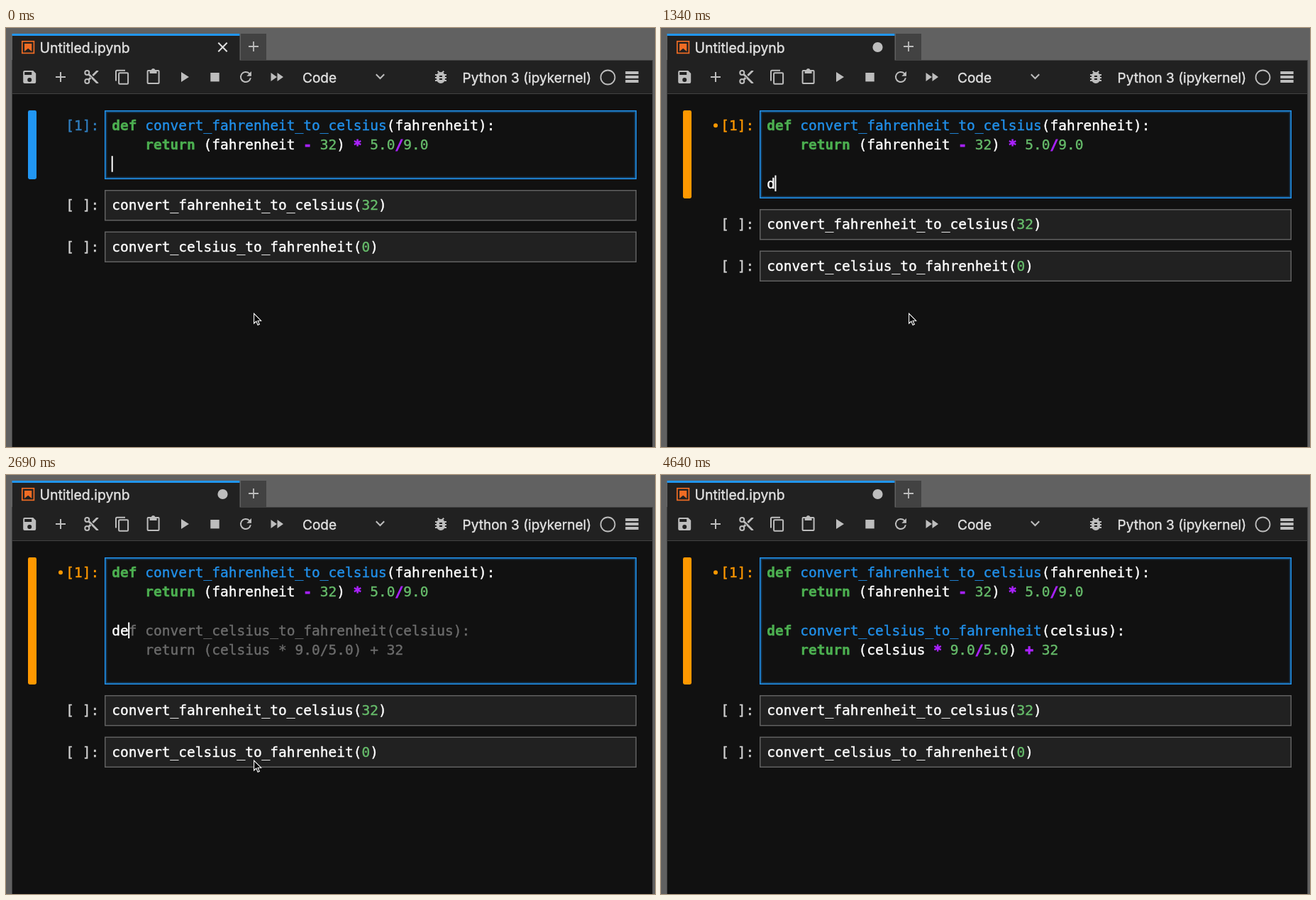
Write an HTML page that moves like this. It is 915x590 px and loops after 5.21 s.

```html
<!DOCTYPE html>
<html lang="en">
<head>
<meta charset="utf-8">
<title>Notebook autocomplete</title>
<style>
  html, body { margin: 0; width: 100%; height: 100%; overflow: hidden; background: #616161; }
  svg { display: block; color: #fff; }
  text, tspan { white-space: pre; fill: currentColor; stroke: currentColor; stroke-width: .4; }
  .ui { font: 19px Inter, sans-serif; color: #e2e2e2; }
  .title { font-size: 19.4px; }
  .mono, #code, #rest { font: 19.5px "DejaVu Sans Mono", monospace; }
  .icons { fill: #bdbdbd; }
  .line { fill: none; stroke: #bdbdbd; stroke-width: 2; }
  .cell { fill: #212121; stroke: #616161; stroke-width: 1.5; }
  .glow { fill: none; stroke: #2196f3; }
  .prompt { color: #d0d0d0; }
  .kw { color: #4caf50; font-weight: bold; }
  .fn { color: #2190ea; }
  .num { color: #66bb6a; }
  .op { color: #aa22ff; font-weight: bold; stroke-width: .8; }
  .ghost { color: #6c6c6c; }
</style>
</head>
<body>
<svg width="915" height="590" viewBox="0 0 915 590">
  <!-- window -->
  <rect x="8" y="45" width="904" height="560" fill="#424242"/>
  <rect x="9" y="93" width="902" height="500" fill="#111"/>
  <rect x="9" y="46" width="902" height="46" fill="#212121"/>
  <rect x="9" y="8" width="320.5" height="39" fill="#212121"/>
  <rect x="8.5" y="8" width="321" height="3" fill="#2196f3"/>
  <rect x="331" y="8" width="36" height="37" fill="#424242"/>

  <!-- tab -->
  <rect x="22.8" y="18.8" width="16.6" height="16.6" fill="none" stroke="#ef6c24" stroke-width="1.7"/>
  <path d="M26 22h10.3v11l-5.15-4.2L26 33z" fill="#ef6c24"/>
  <text class="ui title" x="47.5" y="34.5">Untitled.ipynb</text>
  <path id="close" class="line" d="M299.3 20.8l12.4 12.4m0-12.4l-12.4 12.4" style="stroke:#e0e0e0"/>
  <circle id="dirty" cx="305.5" cy="27" r="7.1" fill="#bdbdbd"/>
  <path class="line" d="M342 26h14m-7-7v14" style="stroke-width:1.8"/>

  <!-- toolbar -->
  <g class="icons" fill-rule="evenodd">
    <path transform="translate(21.2 57)" d="M17 3H5a2 2 0 0 0-2 2v14a2 2 0 0 0 2 2h14a2 2 0 0 0 2-2V7zM12 19a3 3 0 0 1 0-6 3 3 0 0 1 0 6zM15 9H5V5h10z"/>
    <path transform="translate(65 57)" d="M19 13h-6v6h-2v-6H5v-2h6V5h2v6h6z"/>
    <g transform="translate(108.3 57)">
      <circle class="line" cx="6" cy="6" r="3"/>
      <circle class="line" cx="6" cy="18" r="3"/>
      <path d="M9.6 7.6L22 20v1h-3L7.6 9.6zM19 3l-6 6 2 2 7-7V3zM7.6 14.4L10.5 11.5l2 2L9.6 16.4z"/>
    </g>
    <path class="line" d="M155 74.5V61.3q0-1.6 1.6-1.6H168M160.3 63.2h10.6q1.2 0 1.2 1.2v13.2q0 1.2-1.2 1.2h-10.6q-1.2 0-1.2-1.2V64.4q0-1.2 1.2-1.2z"/>
    <g transform="translate(195.6 57)">
      <rect class="line" x="4" y="3" width="16" height="18" rx="1"/>
      <path d="M7 2h2.2a3 3 0 0 1 5.6 0H17v5H7zM12 2a1 1 0 0 0 0 2 1 1 0 0 0 0-2z"/>
    </g>
    <path d="M247 62v14l11-7z"/>
    <path d="M288.3 63h12.4v12.4h-12.4z"/>
    <path transform="translate(326 57) scale(1.333)" d="M9 13.5a4.5 4.5 0 1 1 3.17-7.67L10 8h5V3l-1.76 1.76A6 6 0 1 0 14.9 10h-1.52A4.5 4.5 0 0 1 9 13.5z"/>
    <path d="M373.5 75l8.5-6-8.5-6zm9-12v12l8.5-6z"/>
    <g transform="translate(601 57)">
      <path d="M6 11a6 6 0 0 1 12 0v4a6 6 0 0 1-12 0zM10 10v2h4v-2zm0 4v2h4v-2z"/>
      <path class="line" d="M4 9h3.5m9 0H20M4 13h3m10 0h3M4 17h3.5m9 0H20M7.7 3.7L10.5 6.5m5.8-2.8L13.5 6.5"/>
    </g>
    <path d="M873.3 61h18.4v4h-18.4zm0 6h18.4v4h-18.4zm0 6h18.4v4h-18.4z"/>
  </g>
  <path class="line" d="M521.8 65.3l5.7 5.7 5.7-5.7"/>
  <circle class="line" cx="848.5" cy="69.5" r="10" style="stroke-width:1.8"/>
  <text class="ui" x="418" y="76.5">Code</text>
  <text class="ui" x="643.6" y="76.5">Python 3 (ipykernel)</text>

  <!-- active cell -->
  <rect id="bar" x="31" y="116" width="12" rx="2.4"/>
  <circle id="bullet" cx="77" cy="137.3" r="3" fill="#ff9800"/>
  <text id="prompt" class="mono" x="84.3" y="144">[1]:</text>
  <rect id="box" x="139.75" y="116.75" width="748.5" fill="#111" stroke="#2196f3" stroke-width="1.5"/>
  <rect id="glow" class="glow" x="141" y="118" width="746" opacity=".45"/>
  <rect id="haze" class="glow" x="142" y="119" width="744" opacity=".18"/>
  <g id="code"></g>
  <rect id="caret" width="2" height="22.5" fill="#fff"/>

  <g id="rest"></g>
  <path id="mouse" d="M349.6 402v14l3.2-3 2.3 5.2 2.2-1-2.3-5h4.6z" fill="#000" stroke="#fff" stroke-width="1.1"/>
</svg>
<script>
const $ = id => document.getElementById(id);
const LOOP = 5210, LEFT = 149.3, CHAR = 11.74, LINE = 27.3, BASE = 144;

// time, column, line; no position means the caret is hidden
const carets = [
  [0, 0, 2], [300], [890, 0, 3], [1340, 1, 3], [1490, 2, 3], [2090],
  [2690, 2, 3], [3290], [3890, 2, 3], [4040, 0, 5], [4640]
];
const pointer = [[0, 0, 0], [4190, 52, 7], [4340, 268, 185], [4490]];

const first = ['def convert_fahrenheit_to_celsius(fahrenheit):',
               '    return (fahrenheit - 32) * 5.0/9.0'];
const second = ['def convert_celsius_to_fahrenheit(celsius):',
                '    return (celsius * 9.0/5.0) + 32'];

const span = (cls, s) => `<tspan class="${cls}">${s}</tspan>`;
const text = (y, s, x = LEFT, cls = '') => `<text class="${cls}" x="${x}" y="${y}">${s}</text>`;
const row = (i, s) => text(BASE + i * LINE, s);

function highlight(s) {
  const isDef = s.startsWith('def');
  return s.replace(/\b(def|return)\b|(\w*convert\w*)|(\d+(?:\.\d+)?)|([-*+\/])/g,
    (m, kw, fn, num) => kw ? span('kw', m) : fn ? (isDef ? span('fn', m) : m)
      : num ? span('num', m) : span('op', m));
}

function secondDef(t) {
  if (t < 1340) return '';
  if (t < 1490) return row(3, 'd');
  if (t < 2240) return row(3, 'de');
  if (t < 4040) return row(3, 'de' + span('ghost', second[0].slice(2))) + row(4, span('ghost', second[1]));
  return second.map((s, i) => row(3 + i, highlight(s))).join('');
}

const at = (steps, t) => steps.filter(s => s[0] <= t).pop();
const show = (id, on) => $(id).setAttribute('visibility', on ? 'visible' : 'hidden');
const set = (id, attrs) => { for (const k in attrs) $(id).setAttribute(k, attrs[k]); };

$('rest').innerHTML = ['convert_fahrenheit_to_celsius(32)', 'convert_celsius_to_fahrenheit(0)']
  .map((s, i) => {
    const y = 228.75 + i * 58.5;
    return `<rect class="cell" x="139.75" y="${y}" width="748.5" height="42"/>`
      + text(y + 27.25, '[ ]:', 84.3, 'prompt') + text(y + 27.25, highlight(s));
  }).join('');

let shown;
function draw(t) {
  const lines = t < 890 ? 3 : t < 2240 ? 4 : 6;
  const height = Math.round(15 + lines * LINE);
  const edited = t >= 1340;
  set('box', { height: height - 1.5 });
  set('glow', { height: height - 4 });
  set('haze', { height: height - 6 });
  set('bar', { height, fill: edited ? '#ff9800' : '#2196f3' });
  $('prompt').style.color = edited ? '#ff9800' : '#307fc1';
  set('rest', { transform: `translate(0 ${height - 97})` });
  show('bullet', edited);
  show('close', t < 890);
  show('dirty', t >= 890);

  const code = first.map((s, i) => row(i, highlight(s))).join('') + secondDef(t);
  if (code !== shown) $('code').innerHTML = shown = code;

  const [, col, line] = at(carets, t);
  show('caret', line !== undefined);
  if (line !== undefined) set('caret', { x: LEFT - .6 + col * CHAR, y: BASE - 18.4 + line * LINE });

  const [, dx, dy] = at(pointer, t);
  show('mouse', dx !== undefined);
  if (dx !== undefined) set('mouse', { transform: `translate(${dx} ${dy})` });
}

const start = performance.now();
function tick() {
  draw((performance.now() - start) % LOOP);
  requestAnimationFrame(tick);
}
tick();
</script>
</body>
</html>
```
